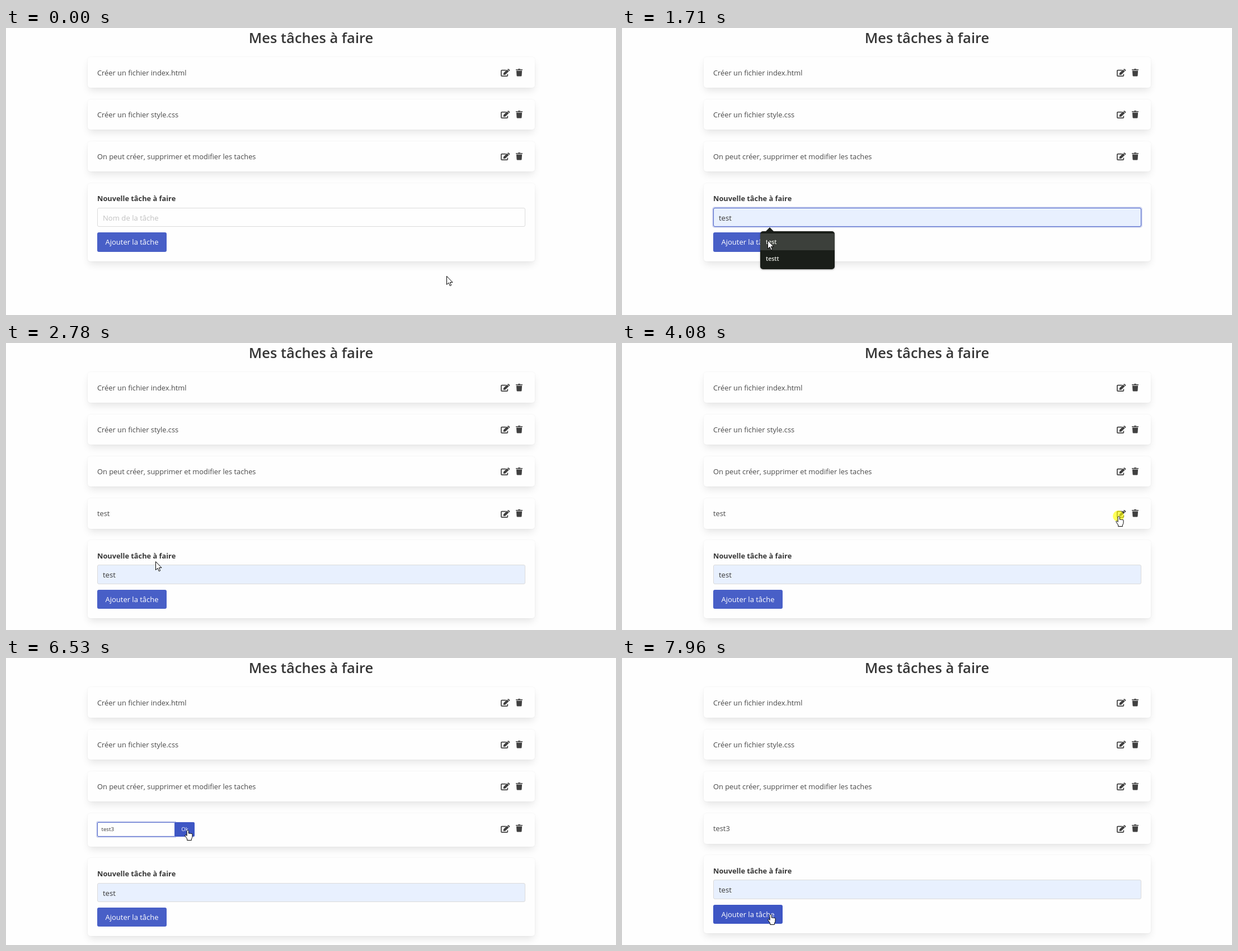
Write an HTML page that moves like this. It is 1090 px wide and 514 px high and loops after 8000 ms.

```html
<!DOCTYPE html>
<html lang="fr">
<head>
<meta charset="utf-8">
<title>Mes tâches à faire</title>
<style>
  html, body { margin: 0; width: 100%; height: 100%; overflow: hidden; background: #fefefe; }
  body { position: relative; font: 12.85px/20.5px "Open Sans", "Noto Sans", sans-serif; color: #4a4a4a; cursor: default; }
  body *, .caret { box-sizing: border-box; }
  h1 { position: absolute; top: 0; left: 0; width: 1090px; margin: 0; text-align: center;
       font-size: 25.5px; line-height: 34.6px; font-weight: 600; color: #363636; }
  .card { position: absolute; left: 146px; width: 799px; height: 54.7px; border-radius: 5px; background: #fefefe;
          box-shadow: 0 7px 14px -2px rgba(10,10,10,.1), 0 0 0 1px rgba(10,10,10,.02); }
  .card > * { position: absolute; white-space: pre; }
  .name { left: 17px; top: 17.6px; }
  .edit { left: 738px; top: 20.8px; }
  .trash { left: 765px; top: 20.6px; }
  #form { height: 139.8px; }
  .label { left: 17px; top: 17.5px; font-size: 12.8px; font-weight: 700; color: #363636; }
  .field { left: 17px; background: #fefefe; border: 1px solid #dbdbdb; color: #363636; }
  .field.hover { border-color: #b5b5b5; }
  .field.focus { border-color: #485fc7; box-shadow: 0 0 0 2px rgba(72,95,199,.25); }
  .field.filled { background: #e8f0fe; }
  .button { background: #485fc7; color: #fff; text-align: center; }
  .button.hover { background: #3e56c4; }
  #input { top: 44.3px; width: 765px; height: 34.2px; padding: 1px 0 0 9px; border-radius: 3px; font-size: 13.1px; line-height: 32.2px; }
  #add { left: 17px; top: 88.5px; width: 124px; height: 34.2px; border-radius: 3px; padding-top: 1px; font-size: 13px; line-height: 33.2px; }
  #small { top: 16.5px; width: 139px; height: 25.7px; padding-left: 6.5px; border-radius: 2px 0 0 2px; font-size: 9.7px; line-height: 24px; }
  #ok { left: 156px; top: 16.5px; width: 35px; height: 25.7px; border-radius: 0 2px 2px 0; font-size: 9.7px; line-height: 26px; }
  .hint { color: rgba(54,54,54,.3); }
  .caret { display: inline-block; width: 1px; height: 18px; margin-right: -1px; vertical-align: middle; background: #222; }
  #small .caret { height: 14px; }
  #popup { position: absolute; width: 133px; height: 68px; border-radius: 5px; background: #1a1e19;
           box-shadow: 0 1px 3px rgba(0,0,0,.35); color: #e8eae4; font-size: 10.5px; font-weight: 600; }
  #popup::before { content: ""; position: absolute; left: 10px; top: -7px; border: solid transparent;
                   border-width: 0 7.5px 7.5px; border-bottom-color: #1a1e19; }
  #popup div { position: relative; top: 4px; height: 30px; line-height: 30px; padding-left: 10px; }
  #popup div.hover { background: #3c403b; }
  #overlay { position: absolute; left: 0; top: 0; }
  .hidden { display: none !important; }
</style>
</head>
<body>
<h1>Mes tâches à faire</h1>
<div id="tasks"></div>
<div class="card" id="form">
  <span class="label">Nouvelle tâche à faire</span>
  <div class="field" id="input"><span class="value"></span><i class="caret"></i><span class="hint">Nom de la tâche</span></div>
  <div class="button" id="add">Ajouter la tâche</div>
</div>
<div id="popup"><div id="choice">test</div><div>testt</div></div>
<svg id="overlay" width="1090" height="514">
  <defs>
    <symbol id="pen" overflow="visible">
      <path d="M9.5 2.6H2.2Q.9 2.6.9 3.9V12Q.9 13.2 2.2 13.2H11Q12.3 13.2 12.3 12V9.5" fill="none" stroke="#404040" stroke-width="1.7"/>
      <path d="M4.9 7.7L11.3 1.4 14.6 4.6 8.2 10.7 4.7 11.1ZM12 .8Q13.3-.4 14.5.6L16 2Q16.8 3 15.9 3.7L15.2 4.2Z" fill="#404040"/>
    </symbol>
    <symbol id="bin" overflow="visible">
      <path d="M0 .9H3.6L4.5 0H7.5L8.4.9H12V2.6H0ZM.9 3.5H11.1L10.5 12.3Q10.4 13.6 9.2 13.6H2.8Q1.6 13.6 1.5 12.3Z" fill="#404040"/>
    </symbol>
  </defs>
  <circle id="click" r="10" fill="#ff0" fill-opacity=".65"/>
  <g id="pointer" stroke="#000" fill="#fff" stroke-linejoin="round">
    <path id="arrow" d="M.5.5V15.5L4 12.3 6.3 17.7 8.7 16.7 6.4 11.5H11Z"/>
    <path id="hand" transform="translate(-4.5 0)" d="M5.2.5C4.2.5 3.6 1.2 3.6 2.2V10.5L2.6 9.3C1.9 8.5.9 8.6.5 9.3 .2 9.9.5 10.5.9 11.1L4.2 16V18.5H11.8V16.2C12.9 14.6 13.5 13 13.5 11V7.6C13.5 6.2 11.6 6 11.2 7.1 11.1 5.9 9 5.7 8.7 6.7 8.4 5.4 6.8 5.4 6.8 6.2V2.2C6.8 1.2 6.2.5 5.2.5Z"/>
    <path id="beam" fill="none" d="M-2.5-6H-.7M.7-6H2.5M0-5.5V5.5M-2.5 6H-.7M.7 6H2.5"/>
  </g>
</svg>
<script>
const LOOP = 8000, STEP = 70;
const ADDED = 2650, EDIT_OPEN = 4150, EDIT_DONE = 6740;
const FIRST_ROW = 52.3, PITCH = 75.2;

// Pointer moves: start time, number of steps, path.
const moves = [
  [70, 9, [[787, 444], [500, 405], [290, 378], [212, 358]]],
  [830, 2, [[212, 358], [195, 346]]],
  [1430, 5, [[195, 346], [260, 380]]],
  [2250, 1, [[260, 380], [267, 391]]],
  [2980, 12, [[267, 391], [450, 340], [700, 268], [790, 262], [872, 296]]],
  [3810, 3, [[872, 296], [887, 310]]],
  [4220, 6, [[887, 310], [336, 312]]],
  [4630, 4, [[336, 312], [257, 315]]],
  [6190, 5, [[257, 315], [323.5, 307.5]]],
  [6870, 1, [[323.5, 307.5], [324, 311]]],
  [7010, 11, [[324, 311], [358, 345], [335, 400], [300, 440]]],
  [7830, 2, [[300, 440], [264.5, 459]]]
];
const clicks = [[900, 1040], [1970, 2110], [2510, 2650], [4010, 4150], [4840, 4980], [6600, 6740]];

const $ = id => document.getElementById(id);
const show = (el, on) => el.classList.toggle("hidden", !on);
const between = (t, from, to) => t >= from && t < to;

const icons = `<svg class="edit" width="17" height="14" overflow="visible"><use href="#pen"/></svg>
  <svg class="trash" width="12" height="14" overflow="visible"><use href="#bin"/></svg>`;
const names = ["Créer un fichier index.html", "Créer un fichier style.css",
  "On peut créer, supprimer et modifier les taches", "test"];
$("tasks").innerHTML = names.map((name, i) =>
  `<div class="card" style="top:${FIRST_ROW + i * PITCH}px"><span class="name">${name}</span>${icons}</div>`).join("");
const task = $("tasks").lastElementChild;
const taskName = task.querySelector(".name");
task.insertAdjacentHTML("beforeend",
  `<div class="field" id="small"><span class="value"></span><i class="caret"></i></div><div class="button" id="ok">Ok</div>`);

function pointerAt(t) {
  const [start, count, path] = moves.findLast(m => t >= m[0]) || moves[0];
  const p = t < start ? 0 : Math.min(1, (Math.floor((t - start) / STEP) + 1) / count);
  const along = p * p * (3 - 2 * p) * (path.length - 1);
  const i = Math.min(path.length - 2, Math.floor(along));
  return path[i].map((v, k) => v + (path[i + 1][k] - v) * (along - i));
}

function setField(el, { value, focus, hover, filled, caret }) {
  el.querySelector(".value").textContent = value;
  el.classList.toggle("focus", focus);
  el.classList.toggle("hover", hover);
  el.classList.toggle("filled", filled);
  show(el.querySelector(".caret"), caret);
}

function draw(t) {
  const added = t >= ADDED, editing = between(t, EDIT_OPEN, EDIT_DONE);
  const formTop = FIRST_ROW + 3 * PITCH + (added ? PITCH : 0) + (editing ? 5.2 : 0);
  const [x, y] = pointerAt(t);
  const over = (left, top, right, bottom) => between(x, left, right) && between(y, top, bottom);

  // The suggestion list hides the controls under the pointer.
  const covered = between(t, 1570, 2250);
  const onInput = !covered && over(163, formTop + 44, 928, formTop + 78.5);
  const onAdd = !covered && over(163, formTop + 88.5, 287, formTop + 122.7);
  const onSmall = editing && over(163, 294, 302, 320);
  const onOk = editing && over(302, 294, 337, 320);
  const onPen = added && over(884, 298, 901, 313);

  show(task, added);
  task.style.height = editing ? "59.9px" : "";
  taskName.textContent = t < EDIT_DONE ? "test" : "test3";
  show(taskName, !editing);
  show($("small"), editing);
  show($("ok"), editing);
  $("ok").classList.toggle("hover", onOk);
  setField($("small"), {
    value: t < 5710 ? "test" : "test3", focus: t >= 4910, hover: onSmall, filled: false,
    caret: between(t, 4910, 5440) || between(t, 5710, 6240)
  });

  const filled = t >= 1640;
  $("form").style.top = formTop + "px";
  show($("input").querySelector(".hint"), !filled);
  $("add").classList.toggle("hover", onAdd);
  setField($("input"), {
    value: filled ? "test" : "", focus: between(t, 970, 2580), hover: onInput, filled,
    caret: between(t, 970, 1500) || between(t, 2040, 2580)
  });

  const popup = $("popup");
  show(popup, between(t, 1040, 2110) || between(t, 5050, 5790));
  popup.style.left = (added ? 214.3 : 247) + "px";
  popup.style.top = (added ? 328 : 364) + "px";
  $("choice").classList.toggle("hover", between(t, 1640, 2110));

  const kind = onAdd || onOk || onPen ? "hand" : onInput || onSmall ? "beam" : "arrow";
  for (const id of ["arrow", "hand", "beam"]) show($(id), id === kind);
  const place = `translate(${Math.round(x)} ${Math.round(y)})`;
  $("pointer").setAttribute("transform", place);
  $("click").setAttribute("transform", place);
  show($("click"), clicks.some(([from, to]) => between(t, from, to)));
}

function frame() {
  draw(performance.now() % LOOP);
  requestAnimationFrame(frame);
}
frame();
</script>
</body>
</html>
```
